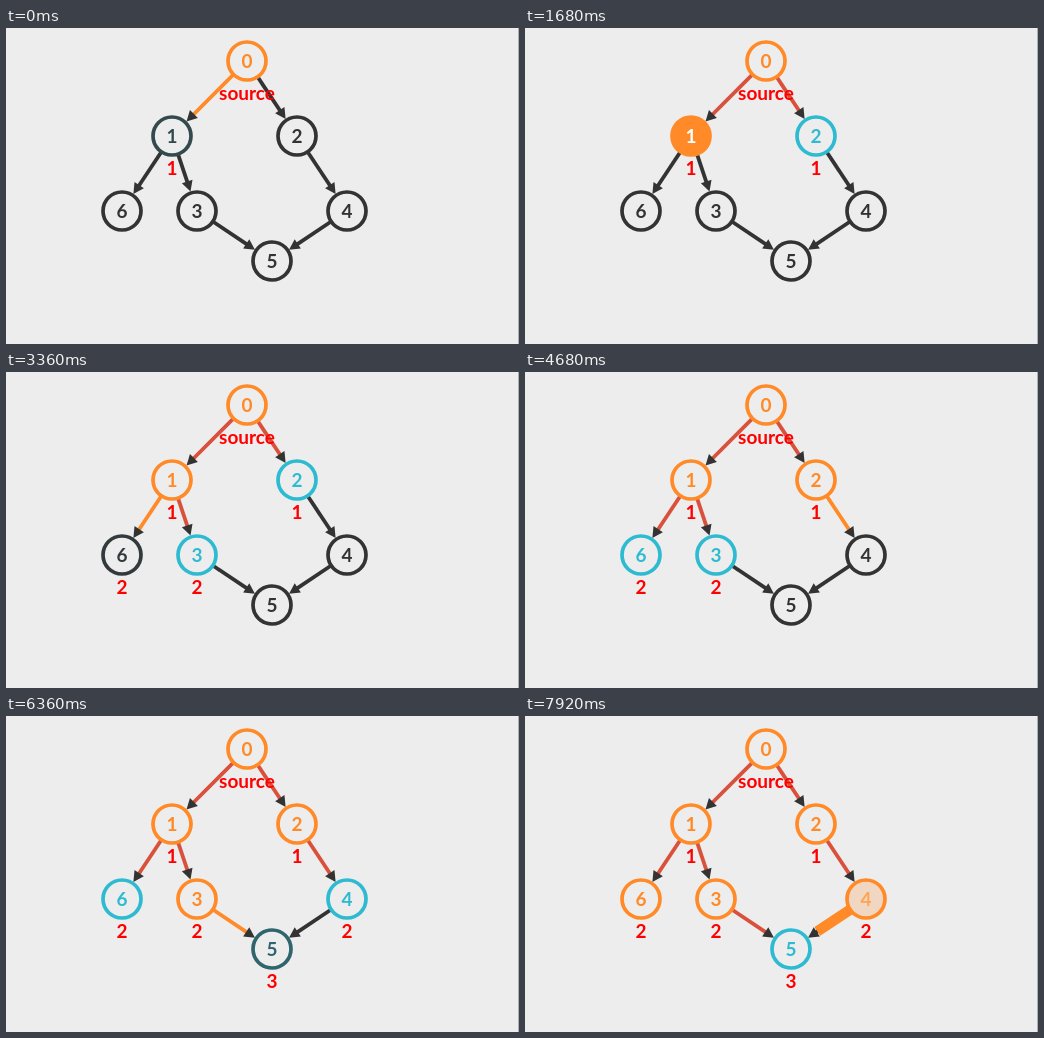
Recreate the animation shown at these times as an HTML page. Size 513x316 px, loop 8000 ms.

```html
<!DOCTYPE html>
<html lang="en">
<head>
<meta charset="utf-8">
<title>Breadth-first search</title>
<style>
  html, body { margin: 0; width: 100%; height: 100%; overflow: hidden; background: #ededed; }
  svg { display: block; width: 513px; height: 316px; }
  text { font: 700 19px Lato, "Open Sans", sans-serif; text-anchor: middle; }
  .label { fill: #f00; }
</style>
</head>
<body>
<svg id="stage" viewBox="0 0 513 316"></svg>
<script>
const LOOP = 8000, TICK = 120, FADE = 300, THIN_AT = 400;
const RADIUS = 21, HEAD = 10.5;
const BG = [237, 237, 237], DARK = [51, 51, 51], WHITE = [255, 255, 255];
const ORANGE = [255, 138, 39], CYAN = [46, 187, 209], RED = [217, 81, 60];
const PAST = -9999, NEVER = 1e9;

// queued, visited and left are the start times of each state, in ms
const nodes = [
  { x: 241, y: 33, queued: PAST, visited: PAST, left: PAST, label: "source" },
  { x: 166, y: 108, queued: -105, visited: 1400, left: 1854, label: "1" },
  { x: 291, y: 108, queued: 870, visited: 3900, left: 4254, label: "1" },
  { x: 191, y: 183, queued: 2340, visited: 5340, left: 5694, label: "2", labelAt: 2280 },
  { x: 341, y: 183, queued: 4785, visited: 7260, left: 7734, label: "2" },
  { x: 266, y: 233, queued: 6225, visited: NEVER, left: NEVER, label: "3" },
  { x: 116, y: 183, queued: 3291, visited: 6780, left: 7260, label: "2" }
];

// from, to, start of the highlight, start of the fade to red
const edges = [
  [0, 1, PAST, 414], [0, 2, 414, 1400], [1, 3, 1854, 2814], [1, 6, 2814, 3900],
  [2, 4, 4254, 5340], [3, 5, 5694, 6780], [4, 5, 7734, NEVER]
].map(([from, to, hot, red]) => ({ from, to, hot, red }));

const stage = document.getElementById("stage");

function add(tag, attrs, text) {
  const el = document.createElementNS("http://www.w3.org/2000/svg", tag);
  set(el, attrs);
  if (text) el.textContent = text;
  return stage.appendChild(el);
}

function set(el, attrs) {
  for (const key in attrs) el.setAttribute(key, attrs[key]);
}

// cubic in-out progress of a fade that begins at start
function ease(t, start) {
  const p = Math.min(1, Math.max(0, (t - start) / FADE));
  return p < 0.5 ? 4 * p ** 3 : 1 - 4 * (1 - p) ** 3;
}

const mix = (a, b, p) => a.map((v, i) => v + (b[i] - v) * p);
const css = c => `rgb(${c.map(Math.round).join(",")})`;

add("rect", { x: 512, y: 0, width: 1, height: 316, fill: "#b0b0b0" });

for (const e of edges) {
  const a = nodes[e.from], b = nodes[e.to];
  const len = Math.hypot(b.x - a.x, b.y - a.y);
  const ux = (b.x - a.x) / len, uy = (b.y - a.y) / len;
  e.at = (d, side = 0) => [a.x + ux * d - uy * side, a.y + uy * d + ux * side];
  e.tip = len - RADIUS + 0.5;
  const [x1, y1] = e.at(RADIUS - 2), [x2, y2] = e.at(e.tip - 6);
  e.line = add("line", { x1, y1, x2, y2, "stroke-width": 3.8 });
  const base = e.tip - HEAD;
  add("polygon", {
    points: [e.at(e.tip), e.at(base, 5.6), e.at(base, -5.6)].join(" "),
    fill: css(DARK)
  });
}

for (const e of edges) {
  const [x1, y1] = e.at(RADIUS - 2);
  e.bar = add("line", { x1, y1, stroke: css(ORANGE), "stroke-width": 10.5 });
}

nodes.forEach((n, i) => {
  n.disc = add("circle", { cx: n.x, cy: n.y, r: 19, "stroke-width": 3.7 });
  n.digit = add("text", { x: n.x, y: n.y + 7 }, String(i));
});
for (const n of nodes) {
  n.tag = add("text", { x: n.x, y: n.y + 39, class: "label" }, n.label);
}

function drawEdge(e, t) {
  const age = t - e.hot;
  const color = age > THIN_AT ? mix(ORANGE, RED, ease(t, e.red)) : DARK;
  set(e.line, { stroke: css(color) });
  const growing = age > 0 && age <= THIN_AT;
  const start = RADIUS - 2;
  const [x2, y2] = e.at(start + (e.tip - start) * ease(t, e.hot));
  set(e.bar, { x2, y2, visibility: growing ? "visible" : "hidden" });
}

function drawNode(n, t) {
  const q = ease(t, n.queued), v = ease(t, n.visited), l = ease(t, n.left);
  const cool = mix(DARK, CYAN, q);
  set(n.disc, {
    stroke: css(mix(cool, ORANGE, v)),
    fill: css(mix(mix(BG, ORANGE, v), BG, l))
  });
  set(n.digit, { fill: css(mix(mix(cool, WHITE, v), ORANGE, l)) });
  const shown = t >= (n.labelAt ?? n.queued);
  set(n.tag, { visibility: shown ? "visible" : "hidden" });
}

const began = performance.now();

function draw() {
  const now = (performance.now() - began) % LOOP;
  const t = Math.floor(now / TICK) * TICK;
  for (const e of edges) drawEdge(e, t);
  for (const n of nodes) drawNode(n, t);
  requestAnimationFrame(draw);
}
draw();
</script>
</body>
</html>
```
